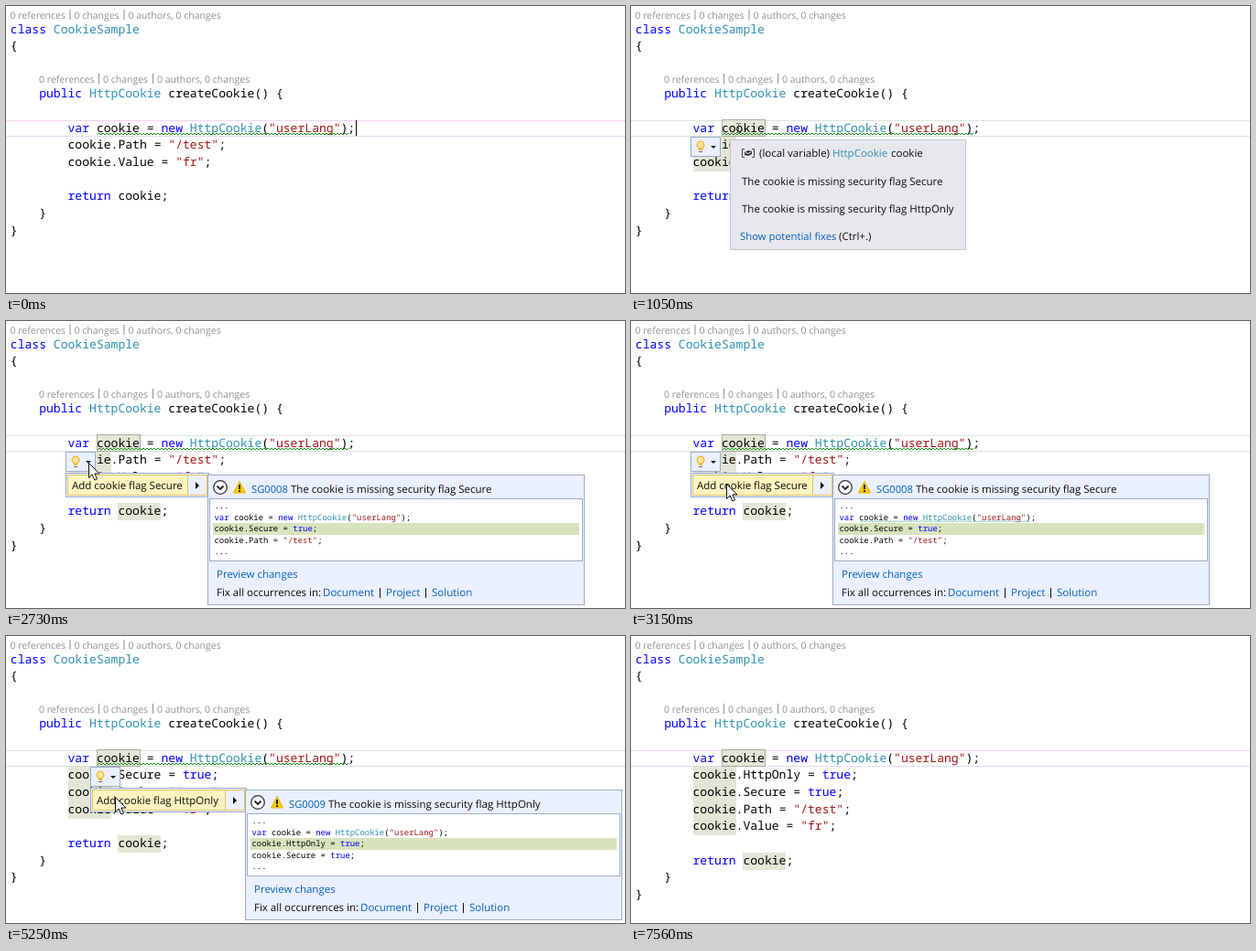
Write an HTML page with a canvas that moves like this. It is 676x314 px and loops after 8.4 s.

```html
<!DOCTYPE html>
<html lang="en">
<head>
<meta charset="utf-8">
<title>Cookie flag quick fixes</title>
<style>
  html, body { margin: 0; width: 100%; height: 100%; overflow: hidden; background: #fff; }
  canvas { display: block; }
</style>
</head>
<body>
<canvas id="stage" width="676" height="314"></canvas>
<script>
const ctx = document.getElementById('stage').getContext('2d');
const STEP = 1050, LOOP = 8400;
const LEFT = 4.8, CODE_SIZE = 13.07, PITCH = 18.62, FIRST_ROW = 137.8;
const BLUE = '#0000ff', TEAL = '#2b91af', RED = '#a31515', LINK = '#0560bd', INK = '#0c0c0c';
const MARK = '#e2e6d6', GREEN = '#159015', PANEL = '#eaf0ff', BORDER = '#9babc9', GOLD = '#e5c365';
const KEYWORDS = ['class', 'public', 'var', 'new', 'return', 'true'];
const TYPES = ['CookieSample', 'HttpCookie'];
const DECLARATION = 'var cookie = new HttpCookie("userLang");';
const SECURE = 'cookie.Secure = true;', HTTP_ONLY = 'cookie.HttpOnly = true;';
const PATH = 'cookie.Path = "/test";', VALUE = 'cookie.Value = "fr";';

function rect(x, y, w, h, fill, stroke) {
  ctx.fillStyle = fill;
  ctx.fillRect(x, y, w, h);
  if (!stroke) return;
  ctx.strokeStyle = stroke;
  ctx.lineWidth = 1;
  ctx.strokeRect(x + .5, y + .5, w - 1, h - 1);
}

function shape(points, fill, stroke, width = 1) {
  ctx.beginPath();
  points.forEach(([x, y]) => ctx.lineTo(x, y));
  if (fill) { ctx.closePath(); ctx.fillStyle = fill; ctx.fill(); }
  if (stroke) { ctx.strokeStyle = stroke; ctx.lineWidth = width; ctx.stroke(); }
}

function circle(x, y, r, fill, stroke) {
  ctx.beginPath();
  ctx.arc(x, y, r, 0, 7);
  ctx.fillStyle = fill;
  ctx.fill();
  ctx.strokeStyle = stroke;
  ctx.lineWidth = 1.3;
  ctx.stroke();
}

function label(text, x, y, color = INK, size = 11.5) {
  ctx.font = `${size}px "Open Sans", sans-serif`;
  ctx.fillStyle = color;
  ctx.fillText(text, x, y);
}

function colorOf(token) {
  if (token[0] === '"') return RED;
  if (KEYWORDS.includes(token)) return BLUE;
  return TYPES.includes(token) ? TEAL : '#000';
}

function code(text, x, y, size = CODE_SIZE, marked = false) {
  const column = size * .6;
  ctx.font = `${size}px "Noto Sans Mono", monospace`;
  for (const { 0: token, index } of text.matchAll(/"[^"]*"|\w+|[^\s\w"]+/g)) {
    const left = x + index * column;
    if (marked && token === 'cookie') {
      if (text === DECLARATION) rect(99, 124, 48, 19, MARK, '#a8aca0');
      else rect(Math.round(left), y - 13, 47, 19, MARK);
    }
    ctx.fillStyle = colorOf(token);
    ctx.fillText(token, left, y);
  }
}

function squiggle(x1, x2, y, height, color, width) {
  const points = [];
  for (let x = x1, i = 0; x <= x2; x += height, i++) points.push([x, y + (i % 2 ? 0 : height)]);
  shape(points, null, color, width);
}

function codeLens(x, y) {
  const gray = '#909090';
  label('0 references', x, y, gray, 10.5);
  label('0 changes', x + 70, y, gray, 10.5);
  label('0 authors, 0 changes', x + 129, y, gray, 10.5);
  rect(x + 65, y - 10, 1, 11, gray);
  rect(x + 124, y - 10, 1, 11, gray);
}

function editor({ added = [], marked, warned, edges }) {
  rect(0, 125, 676, 1, edges[0]);
  rect(0, 142, 676, 1, edges[1]);
  codeLens(4.5, 14);
  codeLens(36, 84);
  code('class CookieSample', LEFT, 30);
  code('{', LEFT, 48);
  code('    public HttpCookie createCookie() {', LEFT, 100);
  const body = [DECLARATION, ...added, PATH, VALUE, '', 'return cookie;'];
  const rowY = i => Math.round(FIRST_ROW + i * PITCH);
  body.forEach((text, i) => code(text, LEFT + 8 * CODE_SIZE * .6, rowY(i), CODE_SIZE, marked));
  code('    }', LEFT, rowY(body.length));
  code('}', LEFT, rowY(body.length + 1));
  if (warned) squiggle(100, 375, 139, 2, GREEN, 1);
}

function bulb(x) {
  rect(x, 143, 33, 22, PANEL, BORDER);
  circle(x + 11, 152, 3.8, '#fde39a', '#f3b62b');
  rect(x + 9, 156, 4, 2, '#f3b62b');
  rect(x + 9, 159, 4, 1, '#6a6a6a');
  shape([[x + 22, 153], [x + 28, 153], [x + 25, 156]], INK);
}

function tooltip() {
  rect(108, 146, 258, 121, '#e7e8ec', '#c3c5d0');
  shape([[124, 156.5], [121.5, 156.5], [121.5, 165.5], [124, 165.5]], null, '#424242');
  shape([[132, 156.5], [134.5, 156.5], [134.5, 165.5], [132, 165.5]], null, '#424242');
  shape([[124, 160], [128, 158], [132, 159], [132, 162], [128, 164], [124, 163]], '#333');
  shape([[125, 160.5], [128, 161.5], [131, 159.8]], null, '#eee');
  label('(local variable)', 140, 165);
  label('HttpCookie', 220, 165, TEAL);
  label('cookie', 284, 165);
  label('The cookie is missing security flag Secure', 121, 196);
  label('The cookie is missing security flag HttpOnly', 121, 226);
  label('Show potential fixes', 119, 256, LINK, 11.3);
  label('(Ctrl+.)', 227, 256);
}

function quickFix({ x, edge, flag, rule, next, underline }) {
  bulb(x);
  rect(x, 166, edge - x + 2, 27, PANEL, BORDER);
  rect(x + 2, 168, edge - x - 2, 23, '#fdf4bf', GOLD);
  rect(edge - 22, 168, 22, 23, PANEL, GOLD);
  shape([[edge - 13, 176], [edge - 13, 184], [edge - 9, 180]], INK);
  label('Add cookie flag ' + flag, x + 7, 184);

  ctx.save();
  ctx.translate(edge, 0);
  rect(0, 168, 412, 143, PANEL, BORDER);
  circle(14, 182, 7.3, '#fff', '#333');
  shape([[10.5, 180.5], [14, 184], [17.5, 180.5]], null, '#222', 1.8);
  shape([[35, 175.5], [41.5, 188], [28.5, 188]], '#ffcc00', '#e8b000');
  rect(34, 179, 2, 5, '#222');
  rect(34, 185, 2, 2, '#222');
  label(rule, 48, 188, LINK, 11.2);
  label(`The cookie is missing security flag ${flag}`, 91, 188);
  rect(2, 194, 408, 69, '#fff', BORDER);
  rect(6, 221, 400, 13, '#d7e3bc');
  ['...', DECLARATION, `cookie.${flag} = true;`, next, '...']
    .forEach((text, i) => code(text, 7.5, 205 + i * 12.6, 8.94));
  if (underline) squiggle(29, 216, 218.5, 1.5, '#5fb8a0', .7);
  label('Preview changes', 10, 281, LINK);
  label('Fix all occurrences in:', 10, 301);
  label('Document', 126, 301, LINK);
  label('Project', 195, 301, LINK);
  label('Solution', 245, 301, LINK);
  rect(188, 292, 1, 11, INK);
  rect(238, 292, 1, 11, INK);
  ctx.restore();
}

function pointer(x, y) {
  const outline = [[0, 0], [0, 16], [3.7, 12.5], [6.3, 18.5], [9, 17.4], [6.4, 11.5], [11.5, 11.5], [0, 0]];
  shape(outline.map(([dx, dy]) => [x + dx + .5, y + dy + .5]), '#fff', '#111');
}

function textPointer(x, y) {
  rect(x, y - 4, 1, 9, '#555');
  for (const end of [y - 5, y + 5]) {
    rect(x - 2, end, 2, 1, '#555');
    rect(x + 1, end, 2, 1, '#555');
  }
}

const PINK_EDGES = ['#f0d4f0', '#dcdcf0'];
const LILAC_EDGES = ['#dcdcf0', '#dcdcf0'];
const GREEN_EDGES = ['#d8e6d8', '#d8e6d8'];
const warning = { marked: true, warned: true, edges: GREEN_EDGES };
const secureFix = { x: 65, edge: 220, flag: 'Secure', rule: 'SG0008', next: PATH };
const httpOnlyFix = { x: 92, edge: 261, flag: 'HttpOnly', rule: 'SG0009', next: SECURE };

const scenes = [
  () => {
    editor({ warned: true, edges: PINK_EDGES });
    rect(382, 125, 1, 17, '#000');
  },
  () => {
    editor(warning);
    bulb(65);
    tooltip();
    textPointer(117, 133);
  },
  () => {
    editor(warning);
    quickFix(secureFix);
    pointer(90, 155);
  },
  () => {
    editor(warning);
    quickFix({ ...secureFix, underline: true });
    pointer(104, 178);
  },
  () => {
    editor({ added: [SECURE], marked: true, edges: LILAC_EDGES });
    textPointer(110, 171);
  },
  () => {
    editor({ ...warning, added: [SECURE] });
    quickFix(httpOnlyFix);
    pointer(119, 176);
  },
  () => editor({ added: [HTTP_ONLY, SECURE], marked: true, edges: PINK_EDGES }),
];

function draw() {
  const step = Math.floor(performance.now() % LOOP / STEP);
  ctx.textRendering = 'geometricPrecision';
  rect(0, 0, 676, 314, '#fff');
  scenes[Math.min(step, scenes.length - 1)]();
  requestAnimationFrame(draw);
}
draw();
</script>
</body>
</html>
```
